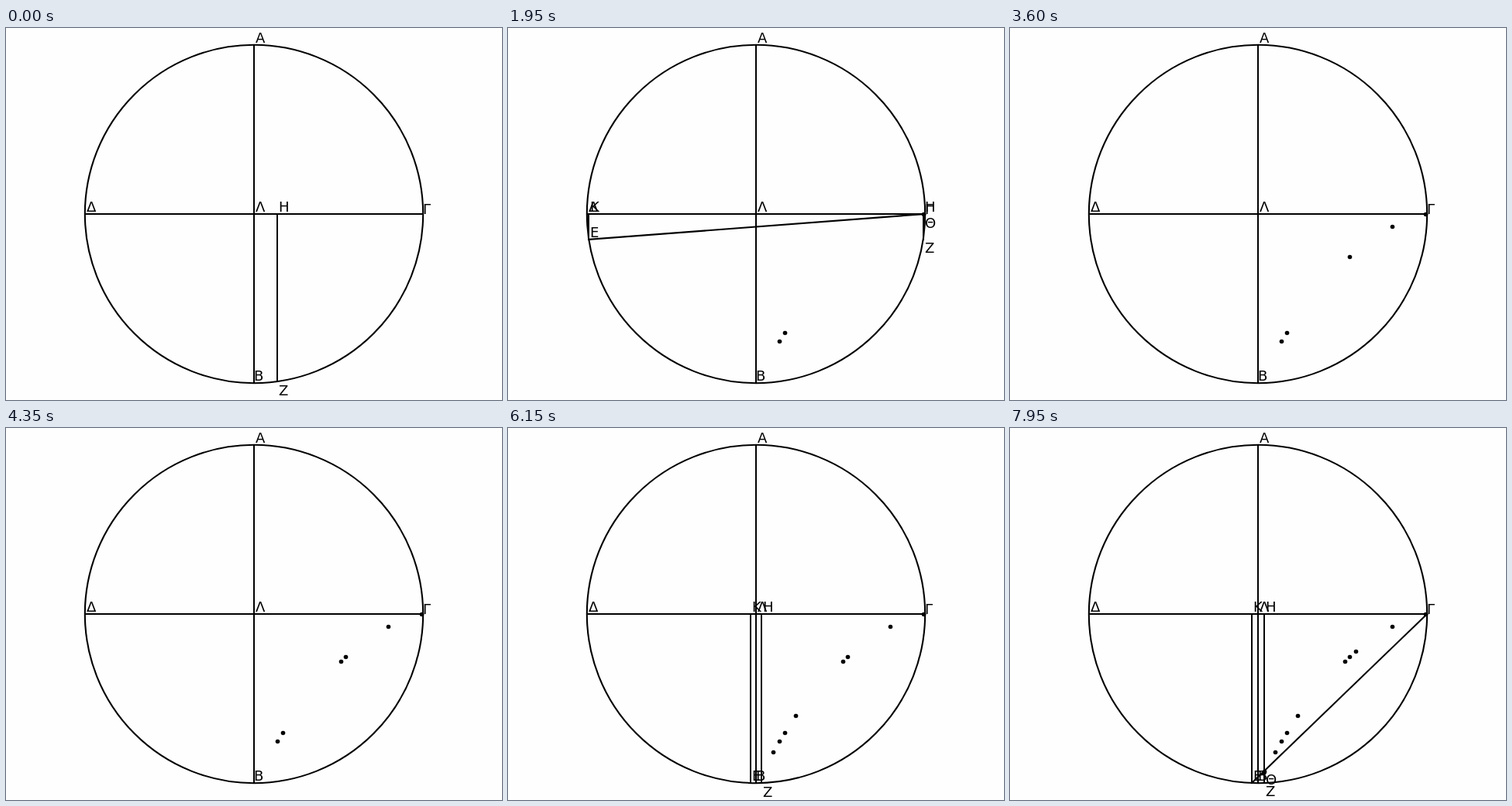
An HTML page that plays this animation: 640x480 px, repeating every 8000 ms.

```html
<!DOCTYPE html>
<html lang="el">
<head>
<meta charset="utf-8">
<title>Cissoid construction</title>
<style>
  html, body { margin: 0; width: 100%; height: 100%; overflow: hidden; background: #fefefe; }
  svg { display: block; width: 640px; height: 480px; }
  line, circle { fill: none; stroke: #000; stroke-width: 2.08; stroke-linecap: square; }
  .axis { stroke-width: 2; }
  .dot { fill: #000; stroke: none; }
  text { font: 18.06px "DejaVu Sans", sans-serif; fill: #000; }
</style>
</head>
<body>
<svg viewBox="0 0 640 480">
  <circle cx="320" cy="240" r="218.18"/>
  <line class="axis" x1="320" y1="22" x2="320" y2="458"/>
  <line class="axis" x1="102" y1="240" x2="538" y2="240"/>
  <text x="322" y="19">Α</text>
  <text x="320" y="455">Β</text>
  <text x="538" y="240">Γ</text>
  <text x="104" y="237">Δ</text>
  <text x="322" y="237">Λ</text>
  <g id="trace"></g>
</svg>
<script>
const LOOP = 8000, STEP = 150, PHASES = 5;
const CX = 320, CY = 240, R = 218.18, RIGHT = CX + R;
// horizontal position of each ordinate ΗΖ, in order of construction
const ordinates = [350, 357, 535.7, 438, 492.6, 431.6, 371.4, 341.7, 327, 446, 328];
const trace = document.getElementById('trace');
const { round, sqrt, floor } = Math;

function add(parent, tag, attrs, content = '') {
  const el = document.createElementNS('http://www.w3.org/2000/svg', tag);
  for (const key in attrs) el.setAttribute(key, attrs[key]);
  el.textContent = content;
  parent.append(el);
  return el;
}

const group = () => add(trace, 'g', { visibility: 'hidden' });

function label(parent, char, x, y, dy) {
  add(parent, 'text', { x: round(x + 2.18), y: round(y + dy) }, char);
}

function vertical(parent, x, y) {
  add(parent, 'line', { class: 'axis', x1: round(x), y1: CY, x2: round(x), y2: round(y) });
}

// Η–Ζ, its mirror Κ–Ε, the chord Ε–Γ and the point Θ where it meets Η–Ζ
function build(x) {
  const mirror = 2 * CX - x;
  const drop = sqrt(R * R - (x - CX) ** 2);
  const foot = CY + drop;
  const cross = CY + drop * (RIGHT - x) / (RIGHT - mirror);
  const [hz, ke, chord, theta, dot] = Array.from({ length: 5 }, group);

  vertical(hz, x, foot);
  label(hz, 'Η', x, CY, -3.27);
  label(hz, 'Ζ', x, foot, 17.45);

  vertical(ke, mirror, foot);
  label(ke, 'Κ', mirror, CY, -3.27);
  label(ke, 'Ε', mirror, foot, -3.27);

  add(chord, 'line', { x1: mirror, y1: foot, x2: RIGHT, y2: CY });
  label(theta, 'Θ', x, cross, 17.45);
  add(dot, 'circle', { class: 'dot', cx: round(x) + .5, cy: round(cross) + .5, r: 2.8 });
  return { parts: [hz, ke, chord, theta], dot };
}

const show = (el, on) => el.setAttribute('visibility', on ? 'visible' : 'hidden');
const rounds = ordinates.map(build);
let shown = -1;

function draw() {
  const step = floor(performance.now() % LOOP / STEP);
  if (step !== shown) {
    shown = step;
    rounds.forEach(({ parts, dot }, i) => {
      const phase = step - i * PHASES;
      parts.forEach((part, k) => show(part, phase >= k && phase < PHASES - 1));
      show(dot, phase >= 3);
    });
  }
  requestAnimationFrame(draw);
}
draw();
</script>
</body>
</html>
```
